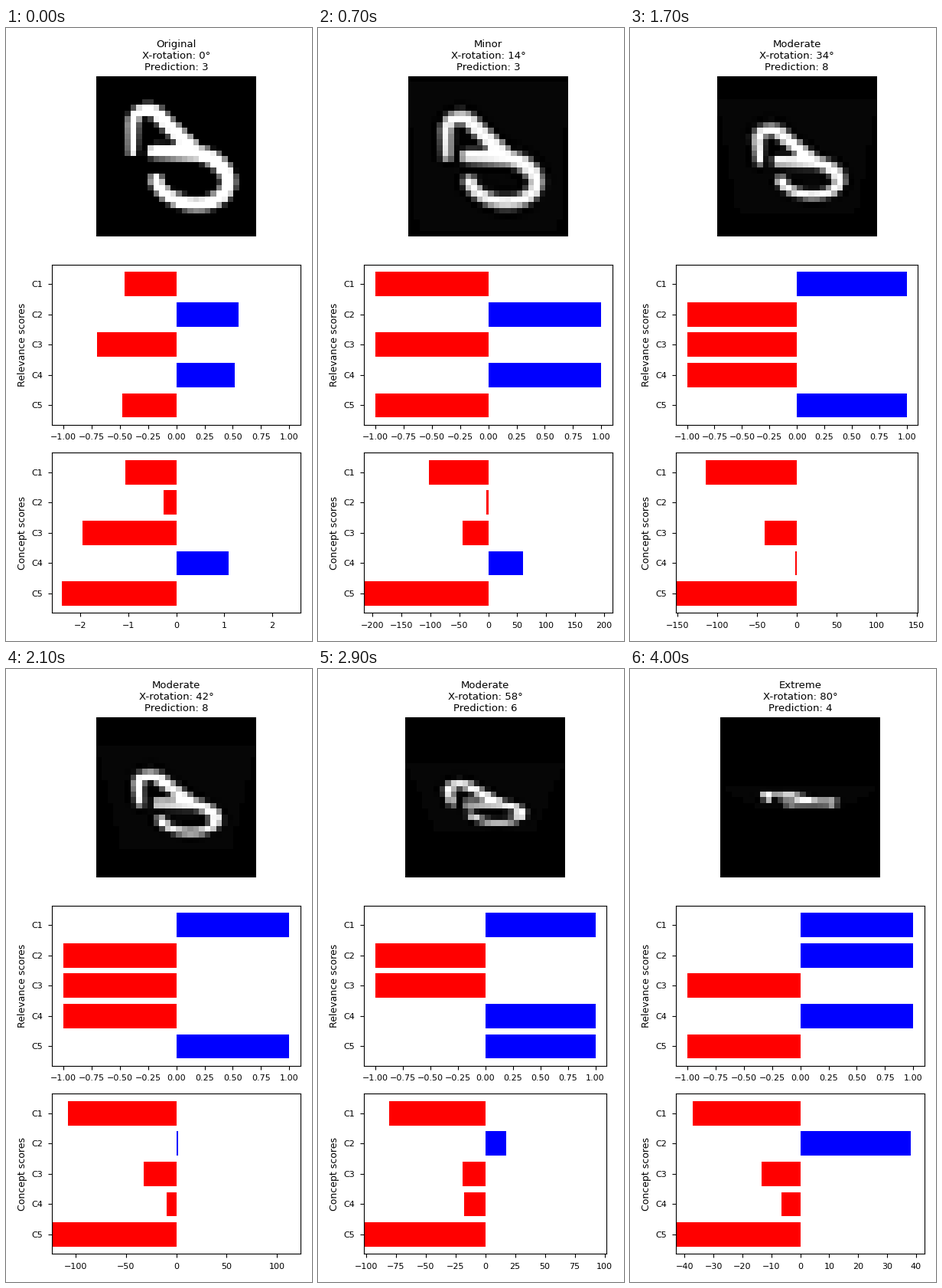
Animation of 400x800 px, one loop 4100 ms. Source, as a matplotlib script:

```python
import numpy as np
import matplotlib.pyplot as plt
from matplotlib.animation import FuncAnimation

FRAMES, INTERVAL, STEP = 41, 100, 2
N = 28
HALF = N / 2
NAMES = ["C1", "C2", "C3", "C4", "C5"]

# First frame, prediction, sign of each relevance score
PHASES = [(0, 3, "-+-+-"), (10, 8, "+-+-+"), (15, 8, "+---+"),
          (22, 6, "+--++"), (30, 4, "++++-"), (37, 4, "++-+-")]

# Unsaturated scores of the untouched digit
START_RELEVANCE = [-0.46, 0.55, -0.70, 0.52, -0.48]
START_CONCEPTS = [-1.06, -0.27, -1.955, 1.09, -2.39]


def line(x0, y0, x1, y1):
    return np.linspace(x0, x1, 80), np.linspace(y0, y1, 80)


def arc(cx, cy, rx, ry, start, end, shear=0):
    a = np.radians(np.linspace(start, end, 160))
    dx = rx * np.cos(a)
    return cx + dx, cy + ry * np.sin(a) + shear * dx


def draw_digit():
    """A leaning three, as pen strokes with a start and end radius."""
    strokes = [(line(6.35, 13.2, 6.4, 8.3), 0.75, 0.95),
               (arc(8.9, 8.3, 2.5, 2.4, 180, 310), 0.95, 1.2),
               (line(10.5, 6.45, 16.5, 12.2), 1.2, 1.4),
               (line(10.1, 13.1, 17.0, 13.4), 1.2, 1.4),
               (arc(16.7, 17.8, 6.4, 4.5, -90, 168, 0.1), 1.4, 1.1)]
    rows, cols = np.mgrid[:N, :N] + 0.5
    ink = np.zeros((N, N))
    for (xs, ys), r0, r1 in strokes:
        for x, y, r in zip(xs, ys, np.linspace(r0, r1, len(xs))):
            dist = np.hypot(cols - x, rows - y)
            ink = np.maximum(ink, np.clip(r + 0.5 - dist, 0, 1))
    return ink


def cubic(t):
    """Cubic convolution kernel."""
    t = np.abs(t)
    near = 1.25 * t**3 - 2.25 * t**2 + 1
    far = -0.75 * (t**3 - 5 * t**2 + 8 * t - 4)
    return np.where(t <= 1, near, np.where(t < 2, far, 0))


def sample(img, x, y):
    x0, y0 = np.floor(x).astype(int), np.floor(y).astype(int)
    out = np.zeros(x.shape)
    for dy in range(-1, 3):
        for dx in range(-1, 3):
            cx, cy = x0 + dx, y0 + dy
            value = img[np.clip(cy, 0, N - 1), np.clip(cx, 0, N - 1)]
            out += value * cubic(x - cx) * cubic(y - cy)
    return out


def unproject(angle, shift=0):
    """Plane coordinates (-1 to 1) seen by each pixel of the tilted view."""
    height = HALF * (1 - (angle / 90) ** 1.25)
    ratio = 1 - 0.47 * np.sin(np.radians(angle))
    q = (1 - ratio) / (1 + ratio)
    yy, xx = np.mgrid[:N, :N] + 0.5 - HALF
    yy = (yy + shift) / height
    v = (yy - q) / (1 - q * yy)
    u = xx * (1 + q * v) / (1 - q) / HALF
    return u, v


def tilt(img, angle):
    ink = np.zeros((N, N))
    shifts = (-0.375, -0.125, 0.125, 0.375)
    for shift in shifts:
        u, v = np.clip(unproject(angle, shift), -1, 1)
        ink += sample(img, (u + 1) * HALF - 0.5, (v + 1) * HALF - 0.5) / len(shifts)
    ink /= min(1, ink.max())
    u, v = unproject(angle)
    inside = (np.abs(u) <= 1) & (np.abs(v) <= 1)
    return np.where(inside, np.clip(6 + 249 * ink, 0, 255), 0)


def bump(i, height, centre, width):
    return height * np.exp(-((i - centre) / width) ** 2)


def concept_scores(i):
    if i == 0:
        return START_CONCEPTS
    return [bump(i, -115, 15, 23.5),
            bump(i, 41, 37.5, 9.3) + bump(i, -4, 5, 8),
            bump(i, -34, 11, 13.5) - 13,
            bump(i, 71, 4, 7.4) + bump(i, -17.5, 29, 11),
            bump(i, -215.5, 5.5, 18.3) + bump(i, -67, 32.3, 9.9)]


def level(angle):
    if angle == 0:
        return "Original"
    return "Minor" if angle <= 30 else "Moderate" if angle <= 60 else "Extreme"


def bars(ax, values, limit, label):
    ax.clear()
    ax.barh(NAMES, values, color=["blue" if v > 0 else "red" for v in values])
    ax.set_xlim(-limit, limit)
    ax.invert_yaxis()
    ax.set_ylabel(label, fontsize=9)
    ax.tick_params(labelsize=8, pad=5)


DIGIT = draw_digit()
fig, (top_ax, rel_ax, con_ax) = plt.subplots(3, 1, figsize=(4, 8), dpi=100)


def update(i):
    angle = i * STEP
    _, prediction, signs = [p for p in PHASES if p[0] <= i][-1]

    top_ax.clear()
    top_ax.imshow(tilt(DIGIT, angle) if i else DIGIT * 255, cmap="gray", vmin=0, vmax=255)
    top_ax.axis("off")
    top_ax.set_title(f"{level(angle)}\nX-rotation: {angle}°\n"
                     f"Prediction: {prediction}", fontsize=9.5)

    relevance = [1 if s == "+" else -1 for s in signs] if i else START_RELEVANCE
    bars(rel_ax, relevance, 1.1, "Relevance scores")
    concepts = concept_scores(i)
    bars(con_ax, concepts, np.abs(concepts).max() + 0.2, "Concept scores")

    fig.subplots_adjust(left=0.1525, right=0.9625, bottom=0.0475, top=0.921, hspace=0.18)
    fig.tight_layout()
    return []


anim = FuncAnimation(fig, update, frames=FRAMES, interval=INTERVAL,
                     init_func=lambda: [], repeat=True, repeat_delay=0)
plt.show()
```
